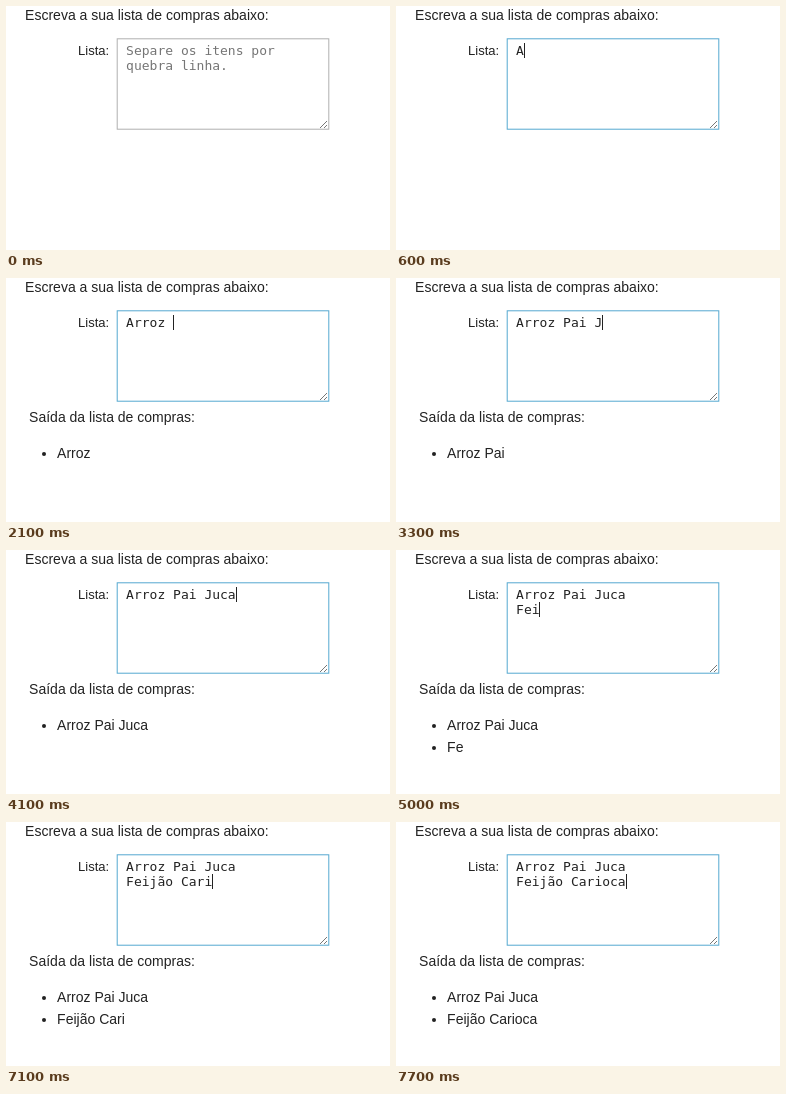
An HTML page for the animation above (8 s loop, 384 by 244 pixels).

```html
<!DOCTYPE html>
<html lang="pt-BR">
<head>
<meta charset="utf-8">
<title>Lista de compras</title>
<style>
  html, body { margin: 0; width: 100%; height: 100%; overflow: hidden; background: #fff; }
  body { position: relative; color: #222; font: 14px/16px "Liberation Sans", Arial, sans-serif; }
  div, svg { position: absolute; white-space: pre; }
  svg { left: 0; top: 0; fill: none; }
  #box { stroke: #b0b0b0; }
  #box.focus { stroke: #55a8d0; }
  #grip { stroke: #555; stroke-width: 0.8; }
  #title { left: 19.11px; top: 1px; }
  #label { left: 72.11px; top: 37px; font-size: 13px; line-height: 15px; }
  #text { left: 120.11px; top: 37px; font: 13px/15px "DejaVu Sans Mono", monospace; }
  #text.hint { color: #757575; }
  #caret { width: 1px; height: 15px; background: #222; }
  #heading { left: 23.11px; top: 131px; }
  .item { left: 51.11px; }
  .item::before {
    content: ""; position: absolute; left: -15.11px; top: 7px;
    width: 4px; height: 4px; border-radius: 50%; background: #222;
  }
</style>
</head>
<body>
<svg width="384" height="244">
  <rect id="box" x="111.2" y="32.8" width="211.6" height="90.4"/>
  <path id="grip" d="M314 122L321 115M318 122L321 119"/>
</svg>
<div id="title">Escreva a sua lista de compras abaixo:</div>
<div id="label">Lista:</div>
<div id="text"></div>
<div id="caret"></div>
<div id="out" style="left:0;top:0">
  <div id="heading">Saída da lista de compras:</div>
  <div class="item" style="top:167px"></div>
  <div class="item" style="top:189px"></div>
</div>
<script>
const LOOP = 8000, FOCUS = 200, TICK = 100, LAG = 60;
const CHAR = 7.826, LINE = 15;
const HINT = "Separe os itens por\nquebra linha.";

// Bursts of typing: keys, time of the first key, pause between keys
const BURSTS = [
  ["A", 600, 0], ["rro", 1180, 180], ["z ", 1830, 200],
  ["Pai ", 2440, 185], ["Ju", 3290, 200], ["ca", 3920, 100], ["\n", 4390, 0],
  ["F", 4720, 0], ["ei", 4910, 80], ["j", 5190, 0], ["ão", 5720, 100],
  [" C", 6090, 300], ["arioca", 6605, 205]
];
const keys = BURSTS.flatMap(([chars, start, gap]) =>
  [...chars].map((char, i) => ({ char, time: start + i * gap })));

const typedBy = t => keys.filter(key => key.time <= t).map(key => key.char).join("");

const byId = id => document.getElementById(id);
const box = byId("box"), text = byId("text"), caret = byId("caret"), out = byId("out");
const items = [...document.querySelectorAll(".item")];

function setText(el, value) {
  if (el.textContent !== value) el.textContent = value;
}

function render(time) {
  const t = Math.floor(time / TICK) * TICK;
  const value = typedBy(t);
  const lines = value.split("\n");
  const focused = t >= FOCUS;

  box.classList.toggle("focus", focused);
  text.classList.toggle("hint", !value);
  setText(text, value || HINT);

  caret.hidden = !focused;
  caret.style.left = 120 + Math.round(lines.at(-1).length * CHAR) + "px";
  caret.style.top = 37 + (lines.length - 1) * LINE + "px";

  // The list follows the typing with a short delay
  const listed = typedBy(t - LAG);
  const entries = listed.split("\n");
  out.hidden = !listed;
  items.forEach((item, i) => {
    item.hidden = !entries[i];
    setText(item, entries[i] || "");
  });
}

const start = performance.now();
function tick() {
  render((performance.now() - start) % LOOP);
  requestAnimationFrame(tick);
}
render(0);
requestAnimationFrame(tick);
</script>
</body>
</html>
```
